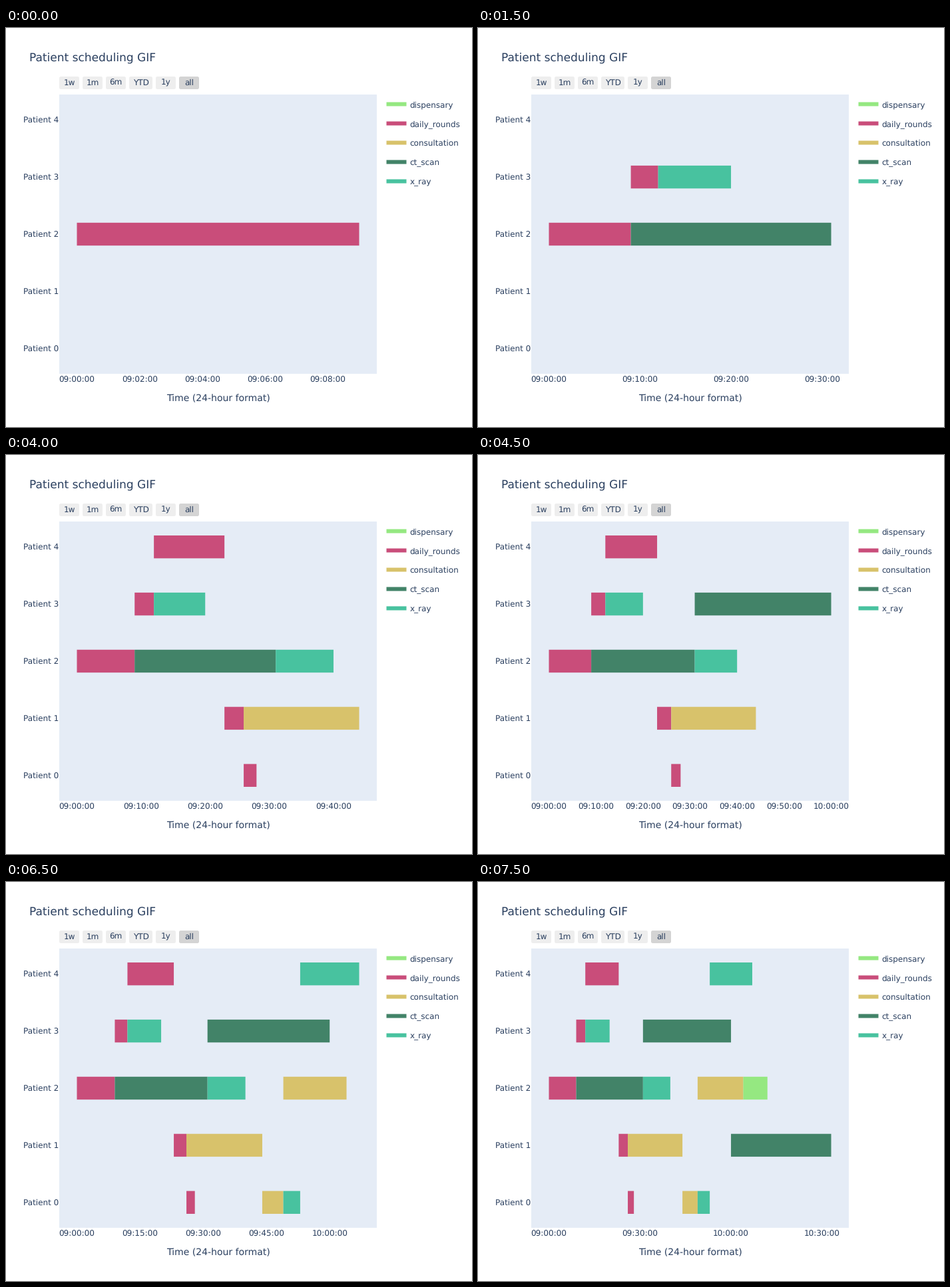
Recreate the animation shown at these times as a matplotlib script. Size 700 by 600 pixels, loop 8000 ms.

```python
import matplotlib.pyplot as plt
from matplotlib.animation import FuncAnimation
from matplotlib.patches import FancyBboxPatch, Rectangle

W, H, DPI = 700, 600, 100
LEFT, RIGHT, TOP, BOTTOM = 80, 557, 100, 520
INK, PANEL = "#2a3f5f", "#e5ecf6"
COLORS = {
    "dispensary": "#95e881",
    "daily_rounds": "#c94d7a",
    "consultation": "#d8c26b",
    "ct_scan": "#428368",
    "x_ray": "#48c29f",
}
# (patient, task, start, end) in minutes after 09:00, in order of booking
TASKS = [
    (2, "daily_rounds", 0, 9),
    (2, "ct_scan", 9, 31),
    (3, "daily_rounds", 9, 12),
    (3, "x_ray", 12, 20),
    (4, "daily_rounds", 12, 23),
    (1, "daily_rounds", 23, 26),
    (0, "daily_rounds", 26, 28),
    (1, "consultation", 26, 44),
    (2, "x_ray", 31, 40),
    (3, "ct_scan", 31, 60),
    (0, "consultation", 44, 49),
    (0, "x_ray", 49, 53),
    (2, "consultation", 49, 64),
    (4, "x_ray", 53, 67),
    (1, "ct_scan", 60, 93),
    (2, "dispensary", 64, 72),
]
X_PAD = (RIGHT - LEFT) / 18
ROW = 0.9 * (BOTTOM - TOP) / 4.4
BAR = 0.4 * ROW

plt.rcParams.update({"font.family": "DejaVu Sans", "text.hinting": "none"})
fig = plt.figure(figsize=(W / DPI, H / DPI), dpi=DPI, facecolor="white")
ax = fig.add_axes([0, 0, 1, 1])
ax.set(xlim=(0, W), ylim=(H, 0))
ax.axis("off")


def text(x, y, s, px=12, ha="left"):
    return ax.text(x, y, s, fontsize=px * 72 / DPI, color=INK, ha=ha, va="baseline")


def rect(x, y, w, h, color):
    return ax.add_patch(Rectangle((x, y), w, h, fc=color, lw=0, snap=False))


def row_y(patient):
    return (TOP + BOTTOM) / 2 + (2 - patient) * ROW


def tick_step(end):
    rough = end * 9 / 8 / ((RIGHT - LEFT) / 80 + 1)
    return next(s for s in (1, 2, 5, 10, 15, 30, 60) if s >= rough)


def draw_static():
    text(35, 50, "Patient scheduling GIF", 17)
    text((LEFT + RIGHT) / 2, 561, "Time (24-hour format)", 14, "center")
    rect(LEFT, TOP, RIGHT - LEFT, BOTTOM - TOP, PANEL)
    for p in range(5):
        text(LEFT - 1, row_y(p) + 4, f"Patient {p}", ha="right")

    x = LEFT
    for label in ("1w", "1m", "6m", "YTD", "1y", "all"):
        w = 35 if label == "YTD" else 30
        ax.add_patch(FancyBboxPatch(
            (x, 73), w, 19, boxstyle="round,pad=0,rounding_size=2.5", lw=0,
            fc="#d4d4d4" if label == "all" else "#eeeeee"))
        text(x + w / 2, 86, label, ha="center")
        x += w + 5

    for i, (name, color) in enumerate(COLORS.items()):
        y = 114.5 + 29 * i
        rect(571.5, y - 3, 30, 6, color)
        text(606.5, y + 4.5, name)


draw_static()
live = []


def update(n):
    while live:
        live.pop().remove()
    shown = TASKS[:n + 1]
    end = max(task[3] for task in shown)
    scale = (RIGHT - LEFT - 2 * X_PAD) / end
    x0 = LEFT + X_PAD

    order = list(COLORS)
    for p, name, a, b in sorted(shown, key=lambda task: order.index(task[1])):
        live.append(rect(x0 + a * scale, row_y(p) - BAR / 2,
                         (b - a) * scale, BAR, COLORS[name]))

    step = tick_step(end)
    for m in range(0, int(end * 17 / 16) + 1, step):
        label = f"{9 + m // 60:02d}:{m % 60:02d}:00"
        live.append(text(x0 + m * scale, 533, label, ha="center"))
    return live


anim = FuncAnimation(fig, update, frames=len(TASKS), init_func=lambda: update(0),
                     interval=500, repeat=True, repeat_delay=0, blit=False)
plt.show()
```
